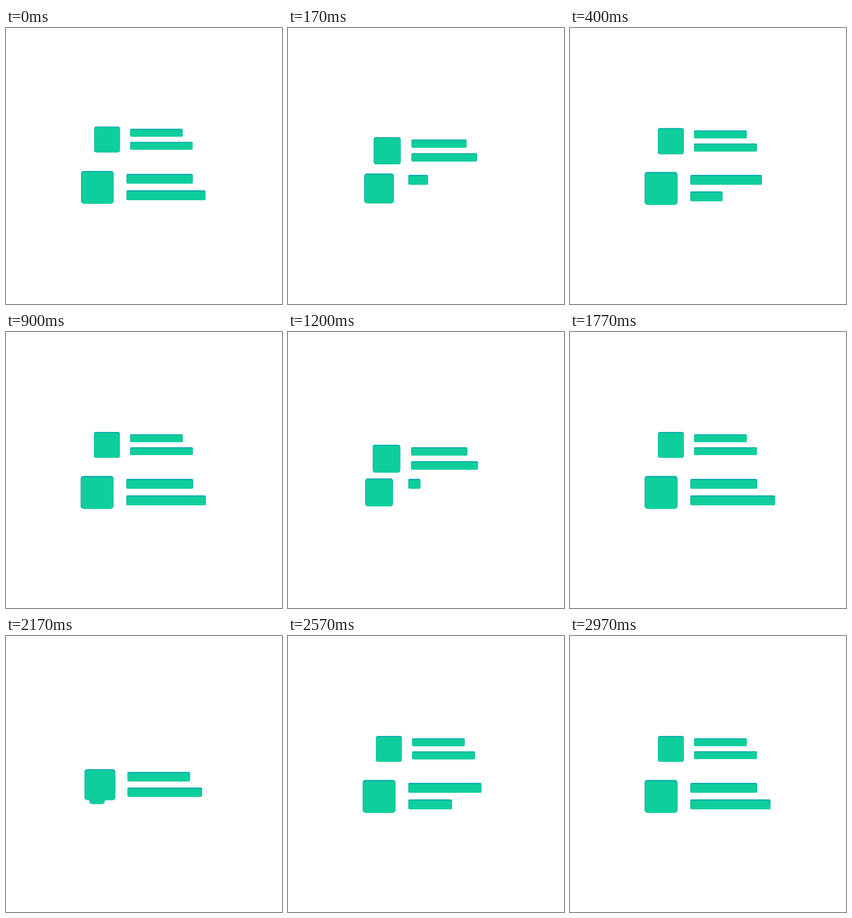
Write an HTML page that moves like this. It is 500 px wide and 500 px high and loops after 3.01 s.

```html
<!DOCTYPE html>
<html lang="en">
<head>
<meta charset="utf-8">
<title>List blocks</title>
<style>
  html, body { margin: 0; width: 100%; height: 100%; overflow: hidden; background: #fff; }
  svg { display: block; width: 100%; height: 100%; }
</style>
</head>
<body>
<svg id="stage" viewBox="0 0 500 500"></svg>
<script>
const NS = 'http://www.w3.org/2000/svg';
const LOOP = 3010;
const FRAME = 33.34;
const CYCLE = 31.92;   // frames between two list steps
const NEAR_Y = 290.5;  // centre of the near slot
const RISE = 86;       // distance to the far slot
const DEPTH = 0.265;

const stage = document.getElementById('stage');

function add(parent, tag, attrs) {
  const node = document.createElementNS(NS, tag);
  set(node, attrs);
  return parent.appendChild(node);
}

function set(node, attrs) {
  for (const key in attrs) node.setAttribute(key, attrs[key]);
}

const clamp = x => Math.min(1, Math.max(0, x));
const quartOut = x => 1 - (1 - clamp(x)) ** 4;

// Cubic bezier easing, solved by bisection.
function cubicBezier(x1, y1, x2, y2) {
  const curve = (s, a, b) => 3 * (1 - s) ** 2 * s * a + 3 * (1 - s) * s * s * b + s ** 3;
  return x => {
    if (x <= 0) return 0;
    if (x >= 1) return 1;
    let low = 0, high = 1;
    for (let i = 0; i < 24; i++) {
      const mid = (low + high) / 2;
      if (curve(mid, x1, x2) < x) low = mid; else high = mid;
    }
    return curve(low, y1, y2);
  };
}

const glide = cubicBezier(0.25, 0.65, 0.28, 1);
const overshoot = cubicBezier(0.67, 1.55, 0.35, 1);

// A raised block: teal edges behind a green face.
function makeBlock(parent, radius) {
  const edge = add(parent, 'rect', { fill: '#08a8b0', rx: radius });
  const rim = add(parent, 'rect', { fill: '#0dbfa5', rx: radius });
  const face = add(parent, 'rect', { fill: '#0ecf9b', rx: radius * 0.8 });
  return (x, y, w, h) => {
    const place = (node, left, top, right) => set(node, {
      x: x + left, y: y + top,
      width: Math.max(0, w - left - right), height: Math.max(0, h - top)
    });
    place(edge, 0, 0, 0);
    place(rim, 0.8, 1.8, 0.5);
    place(face, 1.6, 3, 1.2);
  };
}

function makeItem() {
  const group = add(stage, 'g', {});
  const square = makeBlock(group, 5);
  const bar1 = makeBlock(group, 2.5);
  const bar2 = makeBlock(group, 2.5);
  return {
    show(visible) { set(group, { visibility: visible ? 'visible' : 'hidden' }); },
    place(y, depth) {
      set(group, { transform: `translate(250 ${y}) scale(${1 / (1 + DEPTH * depth)})` });
    },
    size(box, first, second) {
      const side = 59.5 * box;
      square(-85 - side / 2, -side / 2, side, side);
      bar1(-32, -24.5, 121 * first, 18);
      bar2(-32, 5.5, 144 * second, 18);
    }
  };
}

const leaving = makeItem();
const fresh = makeItem();
const rising = makeItem();
leaving.size(1, 1, 1);
rising.size(1, 1, 1);
fresh.place(NEAR_Y, 0);

function render(time) {
  const frame = Math.min(89, Math.floor((time + 5) / FRAME));
  const phase = frame % CYCLE;
  const p = glide((phase + 0.12) / 14);

  leaving.show(p < 0.24);
  leaving.place(NEAR_Y - RISE - 13 * Math.min(1, p / 0.11), 1 + p);
  rising.place(NEAR_Y - RISE * p, p);
  fresh.size(
    quartOut((phase + 0.67) / 12.6),
    overshoot((phase - 2.6) / 19),
    overshoot((phase - 8.7) / 19)
  );
}

const start = performance.now();
function tick() {
  render((performance.now() - start) % LOOP);
  requestAnimationFrame(tick);
}
tick();
</script>
</body>
</html>
```
